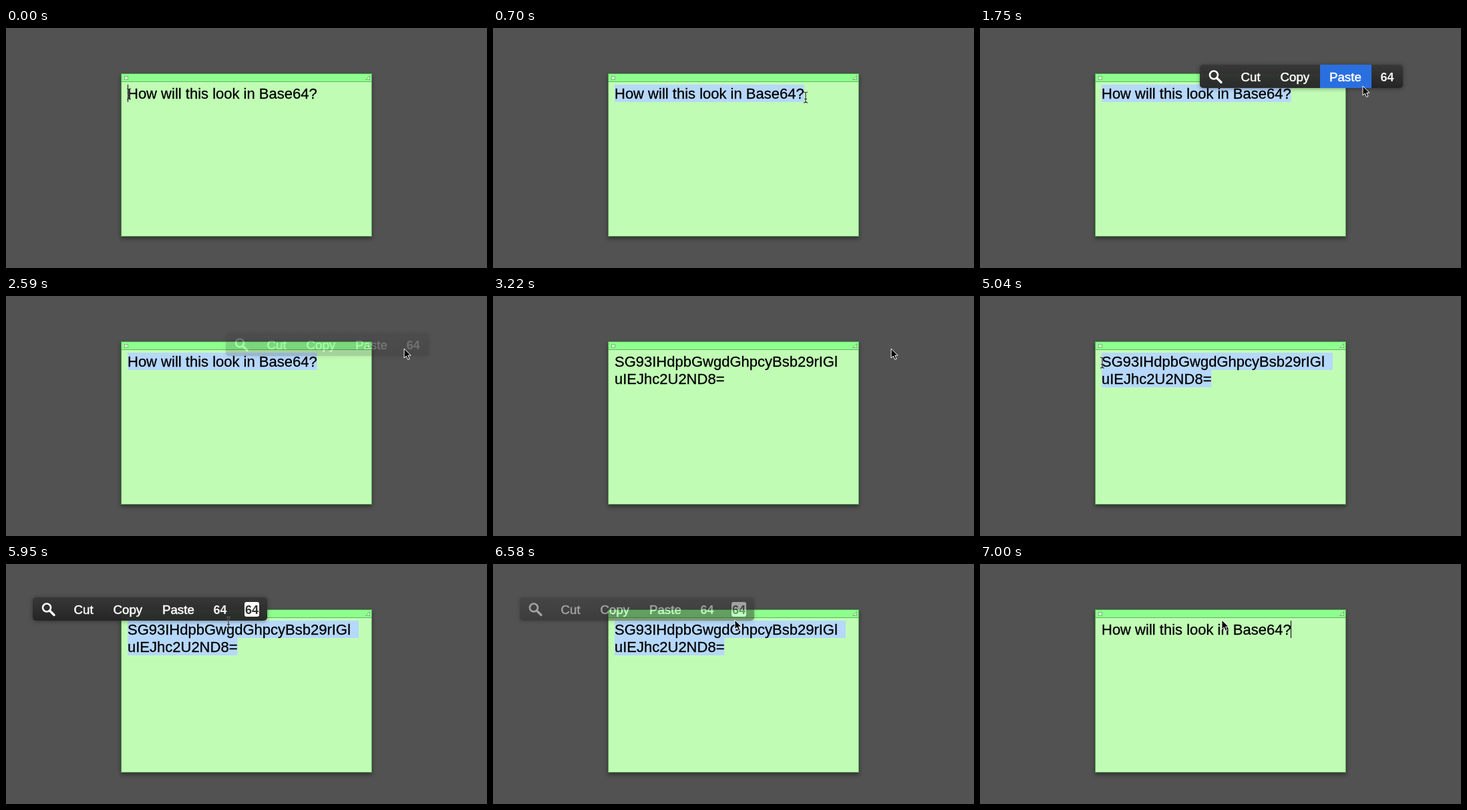
An HTML page that plays this animation: 720 by 360 pixels, repeating every 7.57 s.

```html
<!DOCTYPE html>
<html lang="en">
<head>
<meta charset="utf-8">
<title>Base64 popup</title>
<style>
  html, body { margin: 0; width: 100%; height: 100%; overflow: hidden; background: #525252; }
  svg { display: block; width: 720px; height: 360px; }
  text { font-family: "Liberation Sans", Arial, sans-serif; font-kerning: none; }
  .note { font-size: 22px; fill: #000; stroke: #000; stroke-width: .3px; }
  .paper { filter: drop-shadow(0 3px 3px rgba(0, 0, 0, .42)); }
  .bar { filter: drop-shadow(0 1px 3px rgba(0, 0, 0, .4)); }
  .label { font-size: 18.7px; fill: #fff; stroke: #fff; stroke-width: .5px; }
  .num { font-size: 18px; font-weight: bold; fill: #f4f4f4; }
</style>
</head>
<body>
<svg id="stage" viewBox="0 0 720 360">
  <defs>
    <linearGradient id="dark" x2="0" y2="1">
      <stop offset="0" stop-color="#383838"/>
      <stop offset="1" stop-color="#242424"/>
    </linearGradient>
  </defs>
  <g class="paper"><rect x="172" y="68" width="376" height="245" fill="#4c9a4c"/></g>
  <rect x="173" y="69" width="374" height="11" fill="#8eff8e"/>
  <rect x="173" y="80" width="374" height="1" fill="#5fb45f"/>
  <rect x="173" y="81" width="374" height="231" fill="#c1fcb5"/>
  <rect x="177.5" y="72.5" width="5" height="5" fill="#d3ffcb" stroke="#74bd74"/>
  <path d="M538.5 77.5 L544.5 71.5 V77.5 Z" fill="#c4ffbc" stroke="#6cb56c"/>
  <rect id="sel1" y="85" height="26" fill="#b6d8fb"/>
  <rect id="sel2" y="111" height="26" fill="#b6d8fb"/>
  <text id="line1" class="note" x="182" y="106"></text>
  <text id="line2" class="note" x="182" y="132"></text>
  <rect id="caret" width="1" height="26" fill="#000"/>
  <g id="bars"></g>
  <g id="beam" fill="none">
    <path d="M-3 -8 Q0 -8 0 -6 Q0 -8 3 -8 M0 -6 V6 M-3 8 Q0 8 0 6 Q0 8 3 8 M-2 2.5 H2"
          stroke="#fff" stroke-opacity=".35" stroke-width="2.4"/>
    <path d="M-3 -8 Q0 -8 0 -6 Q0 -8 3 -8 M0 -6 V6 M-3 8 Q0 8 0 6 Q0 8 3 8 M-2 2.5 H2"
          stroke="#222" stroke-width="1.1"/>
  </g>
  <path id="arrow" d="M0 0 V14 L3.2 11 L5.6 16.4 L8 15.4 L5.7 10.1 H10 Z"
        fill="#000" stroke="#fff" stroke-width="1" stroke-linejoin="round"/>
</svg>
<script>
const LOOP = 7570, STEP = 70, LEFT = 182, WRAP = 528;
const PLAIN = ["How will this look in Base64?", ""];
const CODED = ["SG93IHdpbGwgdGhpcyBsb29rIGl", "uIEJhc2U2ND8="];
const ENCODE = 2870, DECODE = 6930;

// pointer path: time, x, y
const PATH = [
  [0, 184, 99], [70, 190, 99], [350, 330, 102], [630, 455, 104], [700, 468, 104],
  [1540, 468, 104], [1750, 573, 87], [1960, 596, 79],
  [3360, 596, 79], [3640, 500, 108], [3850, 407, 127],
  [4130, 407, 127], [4480, 300, 117], [4830, 199, 101], [5040, 183, 100],
  [5600, 183, 100], [5740, 225, 97], [5950, 333, 88], [6090, 362, 84], [LOOP, 362, 84]
];

// popup cells: offset, width
const CELLS = [[0, 47], [47, 59], [106, 74], [180, 77], [257, 47], [304, 47]];
const POPUPS = [
  { x: 329, y: 55, cells: 5, show: 980, hide: 2380 },
  { x: 40, y: 50, cells: 6, show: 5390, hide: 6440 }
];

const $ = id => document.getElementById(id);
const set = (el, attrs) => { for (const k in attrs) el.setAttribute(k, attrs[k]); };
const clamp = v => Math.max(0, Math.min(1, v));

const pen = document.createElement("canvas").getContext("2d");
pen.font = '22px "Liberation Sans", Arial, sans-serif';
pen.fontKerning = "none";
const width = s => pen.measureText(s).width;

// x of the character boundary nearest to the pointer
function snap(line, x) {
  let best = LEFT;
  for (let i = 1; i <= line.length; i++) {
    const edge = LEFT + width(line.slice(0, i));
    if (Math.abs(edge - x) < Math.abs(best - x)) best = edge;
  }
  return best;
}

function buildPopup(p, i) {
  const w = CELLS[p.cells - 1][0] + 47;
  const inverse = p.cells > 5
    ? `<rect x="317" y="7" width="22" height="22" rx="3" fill="#fff"/>
       <text class="num" x="318" y="24.5" style="fill:#303030">64</text>` : "";
  $("bars").insertAdjacentHTML("beforeend", `
    <g id="bar${i}" transform="translate(${p.x} ${p.y})">
      <clipPath id="clip${i}"><rect width="${w}" height="35" rx="5"/></clipPath>
      <rect class="bar" width="${w}" height="35" rx="5" fill="url(#dark)" fill-opacity=".94"/>
      <g clip-path="url(#clip${i})"><rect id="hot${i}" height="35" fill="#2a6fe0"/></g>
      <circle cx="21" cy="15.5" r="6" fill="none" stroke="#fff" stroke-width="2.6"/>
      <path d="M25.5 20 L32 26.5" stroke="#fff" stroke-width="3.4" stroke-linecap="round"/>
      <text class="label" x="61.5" y="25">Cut</text>
      <text class="label" x="120.5" y="25">Copy</text>
      <text class="label" x="194" y="25">Paste</text>
      <text class="num" x="270.5" y="24.5">64</text>
      ${inverse}
    </g>`);
}
POPUPS.forEach(buildPopup);

function pointer(t) {
  let i = 1;
  while (i < PATH.length - 1 && PATH[i][0] <= t) i++;
  const [t0, x0, y0] = PATH[i - 1], [t1, x1, y1] = PATH[i];
  const k = clamp((t - t0) / (t1 - t0));
  return [x0 + (x1 - x0) * k, y0 + (y1 - y0) * k];
}

// selected spans of both lines as [from, to]
function selection(t, x, y, text) {
  const none = [LEFT, LEFT];
  if (t < ENCODE) return [[LEFT, t < 70 ? LEFT : t < 700 ? snap(text[0], x) : LEFT + width(text[0])], none];
  if (t < 4130 || t >= DECODE) return [none, none];
  const end = LEFT + width(text[1]);
  if (t >= 5040) return [[LEFT, WRAP], [LEFT, end]];
  return y < 111 ? [[snap(text[0], x), WRAP], [LEFT, end]] : [none, [snap(text[1], x), end]];
}

function drawPopup(p, i, t, x, y) {
  const alpha = t < p.hide ? clamp((t - p.show + STEP) / 210) : clamp(1 - (t - p.hide) / 260);
  const cell = CELLS.slice(0, p.cells).find(([cx, w]) => x >= p.x + cx && x < p.x + cx + w);
  const flash = t >= p.hide - 140 && t < p.hide - 70;
  const inside = cell && y >= p.y && y < p.y + 35;
  const hot = inside && t < p.hide && !flash;
  set($("bar" + i), { opacity: t < p.show ? 0 : alpha });
  set($("hot" + i), hot ? { x: cell[0], width: cell[1] } : { width: 0 });
}

function draw(t) {
  const text = t >= ENCODE && t < DECODE ? CODED : PLAIN;
  const [x, y] = pointer(t);
  $("line1").textContent = text[0];
  $("line2").textContent = text[1];

  const spans = selection(t, x, y, text);
  spans.forEach(([a, b], i) => set($("sel" + (i + 1)), { x: a, width: b - a }));

  const empty = spans.every(([a, b]) => a === b);
  const blinkOff = t >= 3220 && t < 3780;
  const row = text === CODED ? 1 : 0;
  const at = t < 700 ? LEFT : LEFT + width(text[row]);
  set($("caret"), { x: Math.floor(at), y: 85 + 26 * row, opacity: empty && !blinkOff ? 1 : 0 });

  POPUPS.forEach((p, i) => drawPopup(p, i, t, x, y));

  const arrow = t >= 6090 || y < 81 || x > 548;
  const move = `translate(${Math.round(x)} ${Math.round(y)})`;
  set($("arrow"), { transform: move, opacity: arrow ? 1 : 0 });
  set($("beam"), { transform: move, opacity: arrow ? 0 : 1 });
}

const start = performance.now();
function tick() {
  const t = (performance.now() - start) % LOOP;
  draw(Math.floor(t / STEP) * STEP);
  requestAnimationFrame(tick);
}
draw(0);
requestAnimationFrame(tick);
</script>
</body>
</html>
```
